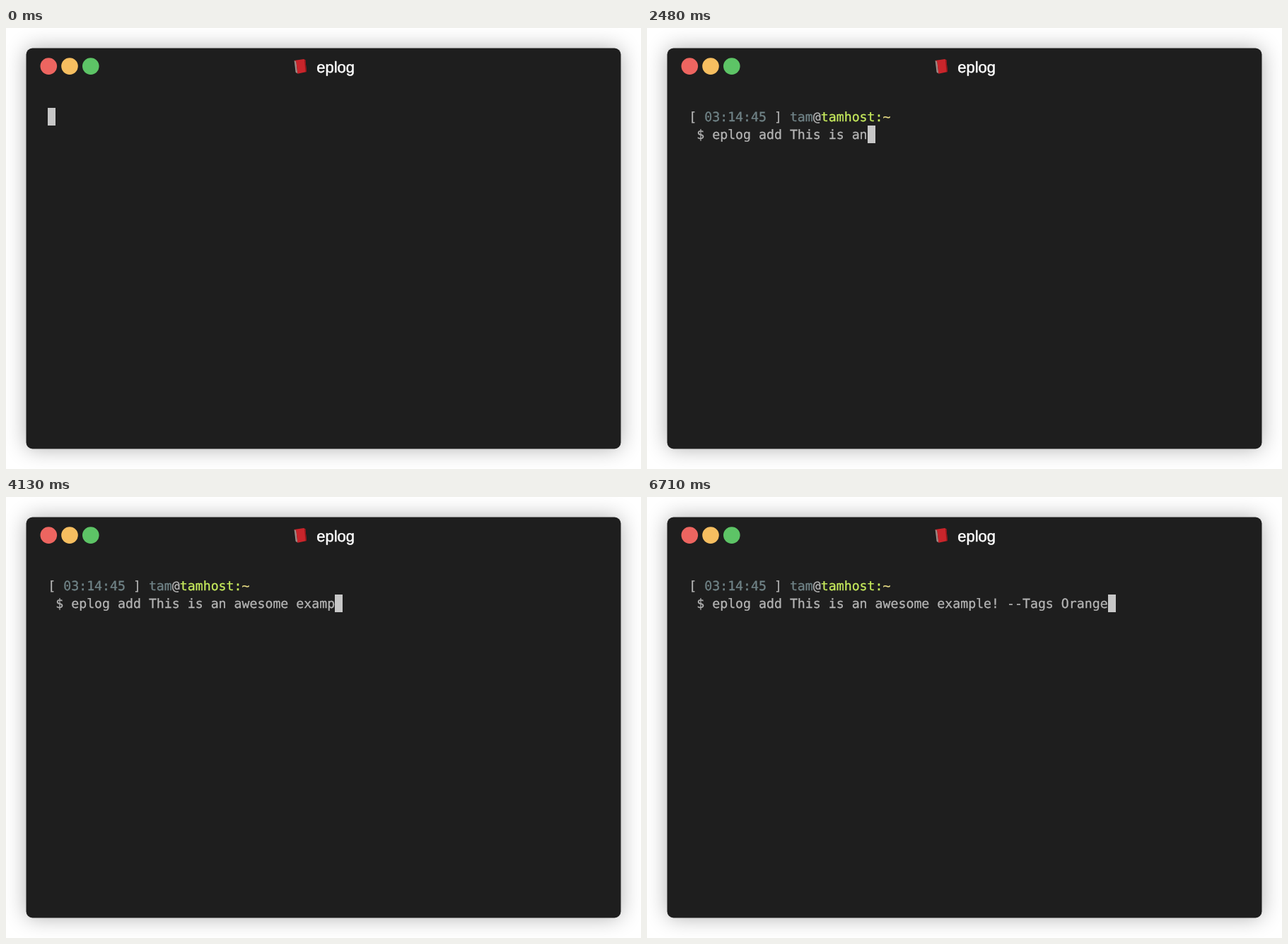
An HTML page that plays this animation: 898 px wide and 624 px high, repeating every 8000 ms.

```html
<!DOCTYPE html>
<html lang="en">
<head>
<meta charset="utf-8">
<title>eplog</title>
<style>
  html, body { margin: 0; width: 100%; height: 100%; overflow: hidden; background: #fff; }
  .shadow {
    position: absolute; left: 29px; top: 29px; width: 840px; height: 566px;
    border-radius: 9px; box-shadow: 0 0 30px rgba(0, 0, 0, .32);
  }
  svg { position: absolute; left: 0; top: 0; display: block; }
  text { white-space: pre; text-rendering: geometricPrecision; }
  .title { font: 22px "Liberation Sans", Arial, sans-serif; fill: #fff; stroke: #fff; stroke-width: .5px; }
  .term { font: 18.23px "DejaVu Sans Mono", monospace; fill: #b4b4b4; stroke: #b4b4b4; stroke-width: .3px; }
  .dim { fill: #708387; stroke: #708387; }
  .host { fill: #c6ea5c; stroke: #c6ea5c; }
  .path { fill: #ebdf86; stroke: #ebdf86; }
  #cursor { fill: #c7c7c7; shape-rendering: crispEdges; }
</style>
</head>
<body>
<div class="shadow"></div>
<svg width="898" height="624" viewBox="0 0 898 624">
  <rect x="28.5" y="28.5" width="841" height="567" rx="9" fill="#1e1e1e"/>
  <circle cx="60.3" cy="54.1" r="11.8" fill="#ed6560"/>
  <circle cx="90" cy="54.1" r="11.8" fill="#f6be60"/>
  <circle cx="119.8" cy="54.1" r="11.8" fill="#5dc466"/>

  <g id="book">
    <path d="M407.6 46 L410.4 46.6 L412.4 64.6 L409.6 62.8Z" fill="#9a8884"/>
    <path d="M407.6 46 L421 44 L423.4 45.2 L425 62 L412.4 64.8 L410.2 47.2Z" fill="#c9252b"/>
    <path d="M422 45.4 L423.4 45.2 L425 62 L423.6 62.3Z" fill="#8f1519"/>
  </g>
  <text class="title" x="439.2" y="62.7">eplog</text>

  <g id="prompt" class="term">
    <text x="59.3" y="132">[ <tspan class="dim">03:14:45</tspan> ] <tspan class="dim">tam</tspan>@<tspan class="host">tamhost:</tspan><tspan class="path">~</tspan></text>
    <text id="line" x="59.3" y="157"></text>
  </g>
  <rect id="cursor" width="11" height="25"/>
</svg>
<script>
  const LOOP = 8000, LEFT = 59.3, CELL = 10.975, ROW = 25, TOP = 113;
  const LEAD = " $ ";
  const COMMAND = "eplog add This is an awesome example! --Tags Orange";

  // Typing pace: [ms, characters typed], steady between points.
  const PACE = [
    [20, 0], [970, 8], [1540, 12], [1580, 13], [2070, 16], [2480, 20], [2680, 21],
    [3160, 25], [4130, 34], [4460, 36], [5190, 40], [5620, 43], [6710, 51]
  ];

  const prompt = document.getElementById("prompt");
  const line = document.getElementById("line");
  const cursor = document.getElementById("cursor");

  function typedAt(time) {
    const next = PACE.findIndex(([t]) => t > time);
    if (next < 0) return COMMAND.length;
    const [t0, n0] = PACE[next - 1], [t1, n1] = PACE[next];
    return n0 + Math.floor((n1 - n0) * (time - t0) / (t1 - t0));
  }

  function render(time) {
    const ready = time >= PACE[0][0];
    const text = ready ? LEAD + COMMAND.slice(0, typedAt(time)) : "";
    prompt.style.display = ready ? "" : "none";
    line.textContent = text;
    cursor.setAttribute("x", Math.round(LEFT + text.length * CELL));
    cursor.setAttribute("y", TOP + (ready ? ROW : 0));
  }

  const start = performance.now();
  function tick() {
    render((performance.now() - start) % LOOP);
    requestAnimationFrame(tick);
  }
  render(0);
  requestAnimationFrame(tick);
</script>
</body>
</html>
```
